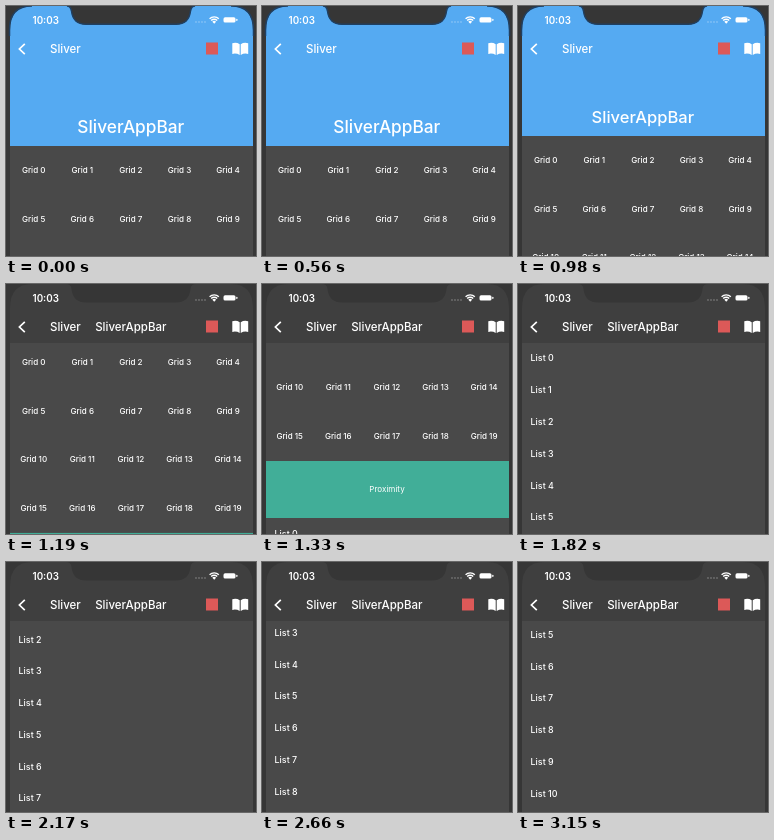
An HTML page for the animation above (3.22 s loop, 250x250 px).

```html
<!DOCTYPE html>
<html lang="en">
<head>
<meta charset="utf-8">
<title>Collapsing app bar</title>
<style>
  html, body { margin: 0; width: 100%; height: 100%; overflow: hidden; background: #363636; }
  svg { display: block; width: 100vw; height: 100vh; }
  text { font-family: Inter, Roboto, sans-serif; font-weight: 500; fill: #fff; }
  .grid { font-size: 8.05px; text-anchor: middle; }
  .list { font-size: 8.9px; }
  .bar { font-size: 11.5px; }
  .time { font-size: 9.8px; font-weight: 600; }
</style>
</head>
<body>
<svg viewBox="0 0 250 250">
  <clipPath id="body"><rect x="4" y="50" width="243" height="200"/></clipPath>
  <rect width="250" height="250" fill="#363636"/>
  <g clip-path="url(#body)">
    <rect x="4" y="50" width="243" height="200" fill="#494949"/>
    <g id="content">
      <rect x="4" y="335" width="243" height="57" fill="#41ae98"/>
      <text class="grid" x="125" y="366" style="font-weight:400">Proximity</text>
    </g>
  </g>

  <path id="dark" fill="#3f3f3f"/>
  <path id="blue" fill="#55aaf2"/>
  <path d="M60 0Q65 0 65.500 5Q67 18.500 80 18.500H170Q183 18.500 184.500 5Q185 0 190 0Z" fill="#363636"/>
  <path id="rim" fill="none" stroke="#203f60" stroke-width="1.500"
    d="M3.500 30V24Q3.500 0 26 0M61 0Q64.500 0 65.500 5Q67 18.200 80 18.200H170Q183 18.200 184.500 5Q185.500 0 189 0M225 0Q247.500 0 247.500 24V30"/>

  <text class="time" x="26.500" y="17.500">10:03</text>
  <g fill="#fff">
    <g opacity=".25">
      <circle cx="190" cy="16" r=".9"/><circle cx="193" cy="16" r=".9"/>
      <circle cx="196" cy="16" r=".9"/><circle cx="199" cy="16" r=".9"/>
    </g>
    <path d="M206.300 15.700L208.200 17.800L210.100 15.700A2.800 2.800 0 0 0 206.300 15.700Z"/>
    <rect x="217.500" y="11.300" width="12" height="5.300" rx="1.600"/>
    <rect x="230.300" y="12.700" width="1.100" height="2.400" rx=".5"/>
  </g>
  <g fill="none" stroke="#fff" stroke-width="1.400">
    <path d="M203.600 12.800A6.400 6.400 0 0 1 212.800 12.800"/>
    <path d="M205.200 14.500A4.200 4.200 0 0 1 211.200 14.500"/>
    <path d="M18.800 37.800L13.400 43L18.800 48.200" stroke-width="1.700"/>
  </g>
  <text class="bar" x="44" y="47">Sliver</text>
  <text class="bar" id="title" text-anchor="middle" y="-2.500">SliverAppBar</text>
  <rect x="200" y="36.500" width="12" height="12" fill="#dc5958"/>
  <path d="M226.300 37.200Q230.500 36 233.700 38.200V49Q230.500 47 226.300 47.900Z
           M234.700 38.200Q238 36 242.200 37.200V47.900Q238 47 234.700 49Z" fill="#fff"/>
</svg>
<script>
  const LOOP = 3220, STEP = 70;
  const MAX = 140, MIN = 59, RANGE = MAX - MIN;
  const FADE = 1 - 33 / RANGE;
  const $ = id => document.getElementById(id);
  const content = $('content'), dark = $('dark'), blue = $('blue');
  const rim = $('rim'), title = $('title');

  function label(cls, x, y, str) {
    const el = document.createElementNS('http://www.w3.org/2000/svg', 'text');
    el.setAttribute('class', cls);
    el.setAttribute('x', x);
    el.setAttribute('y', y);
    el.textContent = str;
    content.append(el);
  }
  for (let i = 0; i < 20; i++) {
    label('grid', 27.7 + 48.6 * (i % 5), 167 + 48.7 * Math.floor(i / 5), 'Grid ' + i);
  }
  for (let i = 0; i < 12; i++) label('list', 12.6, 410.5 + 31.78 * i, 'List ' + i);

  // Scroll track: time in ms, offset in px, speed in px per ms
  const track = [
    [700, 0, 0], [980, 10, .1], [1330, 158, .46], [1610, 272, .35],
    [2170, 393.5, .125], [2660, 432, .045], [2661, 432, 0], [3010, 432, 0],
    [3080, 455, .45], [3150, 493.5, .55], [LOOP, 530, .5]
  ];

  function scrollAt(t) {
    if (t <= track[0][0]) return 0;
    const i = track.findIndex(p => t <= p[0]);
    const [t0, a, va] = track[i - 1], [t1, b, vb] = track[i];
    const h = t1 - t0, u = (t - t0) / h, u2 = u * u, u3 = u2 * u;
    return a * (2 * u3 - 3 * u2 + 1) + b * (3 * u2 - 2 * u3)
      + h * va * (u3 - 2 * u2 + u) + h * vb * (u3 - u2);
  }

  function draw(now) {
    const t = Math.floor((now % LOOP) / STEP) * STEP;
    const s = scrollAt(t);
    const k = Math.min(1, s / RANGE);
    const bottom = MAX - RANGE * k;
    const tint = 1 - Math.max(0, (k - FADE) / (1 - FADE));
    const shape = `M4 ${bottom}V24Q4 0 26 0H225Q247 0 247 24V${bottom}Z`;
    dark.setAttribute('d', shape);
    blue.setAttribute('d', shape);
    blue.setAttribute('opacity', tint);
    rim.setAttribute('opacity', tint);
    content.setAttribute('transform', `translate(0 ${-s})`);
    title.setAttribute('transform', `translate(124.800 ${bottom - 9.4}) scale(${1.5 - .5 * k})`);
  }

  const start = performance.now();
  function tick() {
    draw(performance.now() - start);
    requestAnimationFrame(tick);
  }
  tick();
</script>
</body>
</html>
```
